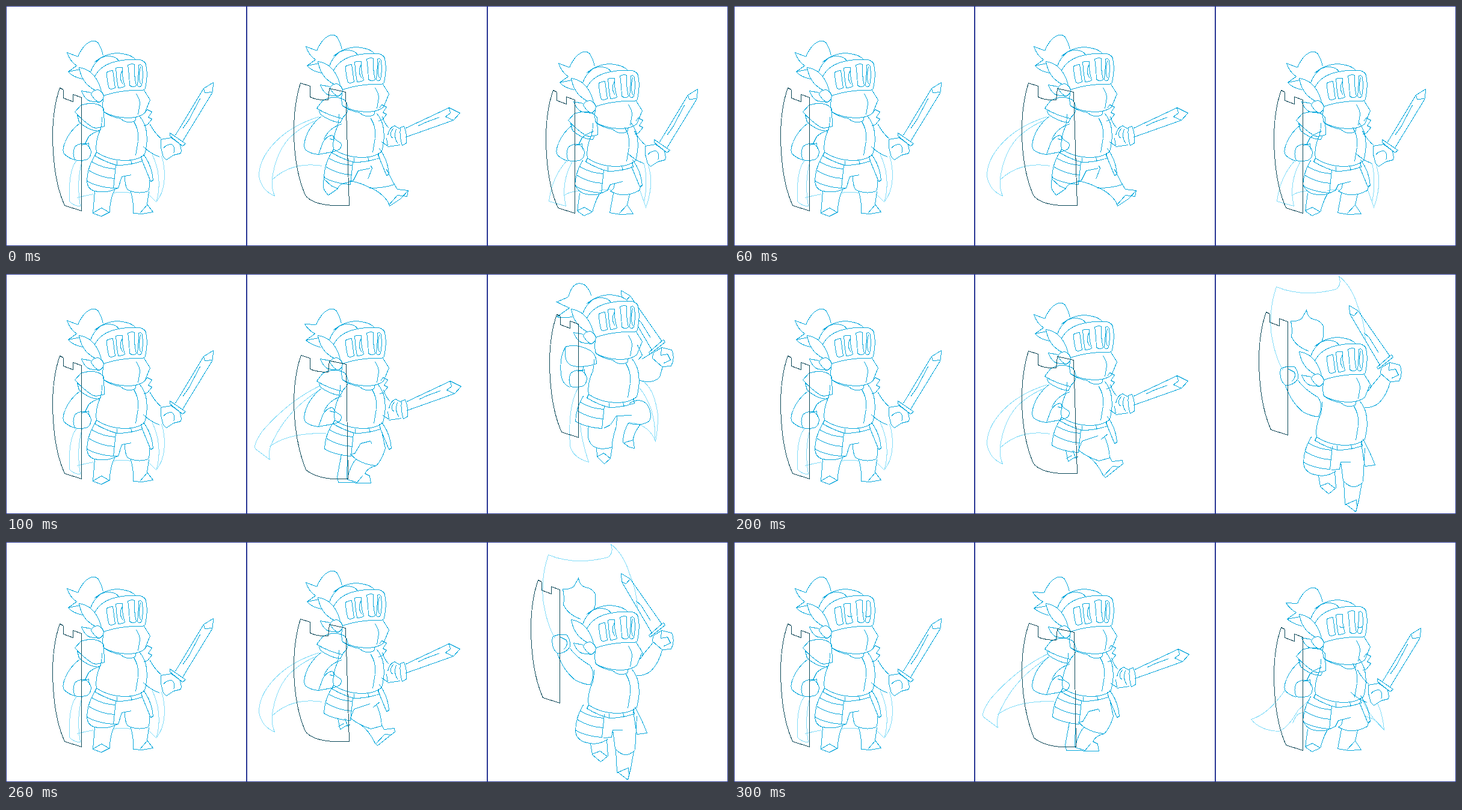
An HTML page for the animation above (0.4 s loop, 1200 by 400 pixels).

```html
<!DOCTYPE html>
<html lang="en">
<head>
<meta charset="utf-8">
<title>Knight: idle, run, jump</title>
<style>
html, body { margin: 0; width: 100%; height: 100%; overflow: hidden; background: #fff; }
svg { display: block; width: 1200px; height: 400px; }
path { fill: none; stroke: #08a8dc; stroke-width: 1; }
path.fill { fill: #fff; }
path.cape { stroke: #82dcf8; }
path.shield { stroke: #0a4858; }
path.frame { stroke: #283593; }
</style>
</head>
<body>
<svg id="stage" viewBox="0 0 1200 400" shape-rendering="crispEdges"></svg>
<script>
const parts = {
  frame: 'M0 0H399V399H0Z',

  // Head and body, shared by all three actions
  plume: 'M119 84L101 77Q106 92 117 99L103 109Q110 118 127 121M119 84Q127 65 139 59Q149 55 154 63Q159 72 161 82M103 109L123 105',
  plumeLow: 'M119 84L100 83Q107 94 117 99L102 110Q112 118 127 122M119 84Q127 65 139 59Q149 55 154 63Q159 72 161 82M102 110L123 106',
  plumeRise: 'M934 38L915 46Q926 52 936 56L915 71Q928 74 944 70M934 38Q939 20 948 16Q960 13 966 23Q971 29 972 36',
  plumeFall: 'M965 128Q976 118 979 104V86Q974 77 963 75Q953 73 951 60L943 74Q935 79 925 78Q928 92 926 104Q934 121 955 128',
  'helm.fill': 'M140 110Q144 95 160 84Q180 75 198 80Q209 82 215 89L222 89Q230 91 232 97Q236 115 231 136Q230 140 225 140Q190 139 162 149Q150 130 147 117Z',
  head: 'M147 117Q155 101 175 94Q198 87 222 89M146 94Q158 82 172 83Q183 84 187 91'
    + 'M167 110Q172 107 177 107L181 136Q175 139 171 137Q167 125 167 110ZM182 103Q187 101 193 102Q192 118 197 133Q193 136 186 136Q183 120 182 103Z'
    + 'M202 98Q208 95 213 97Q212 115 216 132Q211 136 205 132Q204 110 202 98ZM220 98Q225 96 226 101Q228 118 225 132Q221 136 218 132Q220 115 220 98Z',
  jaw: 'M229 140L239 156L230 178Q222 185 205 186Q180 186 162 176Q159 167 161 155M216 146Q222 155 222 163L219 181M162 176Q175 185 190 187Q200 197 214 191L216 184',
  'leaf.fill': 'M158 141Q153 121 140 110Q133 104 121 102Q124 120 134 130Q143 138 148 140',
  ear: 'M141 147Q143 140 152 139Q160 141 162 149Q161 158 154 160Q147 157 141 147M141 144L125 141Q130 155 139 158L154 160',
  open: 'M193 107Q186 119 194 130M223 101Q219 117 223 130',
  blink: 'M188 122Q192 126 197 123M218 123Q222 126 226 122',
  torso: 'M159 184Q159 195 157 204Q147 226 150 243Q170 257 200 257Q220 256 230 247Q237 220 231 200Q226 188 222 184M212 192Q221 207 219 225L215 249'
    + 'M150 243L147 249Q165 260 184 265Q205 265 226 258L224 250M184 265V257M207 257L209 264',
  skirt: 'M147 249Q135 268 134 291Q150 301 178 303L182 265M142 259Q160 270 181 271M138 274Q158 286 180 287',
  flap: 'M226 258L240 292L244 290Q242 265 228 247',
  shoulder: 'M114 176L124 165Q138 160 150 163Q160 166 162 172L163 200Q152 204 144 202Q128 192 114 176M118 181L121 193Q138 208 155 208L157 203',
  guard: 'M230 178L234 172L242 176L236 185L242 188L235 197L229 199',
  arm: 'M122 195Q105 208 98 226Q92 240 96 246Q105 254 114 256M157 206Q145 210 137 217L131 229',
  hand: 'M114 234Q120 228 131 229Q140 234 141 243Q140 254 132 256Q122 258 114 256Q109 245 114 234M126 231L137 228L138 238',
  sword: 'M239 197Q247 212 258 221M228 234Q240 246 255 251M257 222L274 219L288 229Q292 238 290 245L278 248L266 256L261 251L257 236ZM261 237Q265 230 275 230Q282 236 278 245'
    + 'M272 211L298 229L293 233L272 216ZM281 215L328 137L344 127L343 143L293 225M328 137L330 144L343 143M293 204L303 190L322 154',
  shield: 'M95 139L89 136Q77 170 77 218Q78 290 97 332L125 341V152L111 147V159L95 153V139',

  // Idle
  legs: 'M178 303L186 303L192 284L208 281M197 283Q197 300 202 306Q220 314 236 308Q239 300 238 290M134 291Q135 305 147 308Q165 312 180 305L186 303'
    + 'M147 308L144 345L158 350L172 343Q172 322 180 306M145 344L158 336L172 344M207 309Q212 328 211 345L225 346L244 343L234 330L237 309M222 345L234 331',
  cape: 'M118 256Q103 270 105 325Q112 333 123 333Q116 295 126 257M118 319Q129 316 145 313M179 311Q192 308 207 311M236 313L249 326Q263 310 263 280Q262 260 258 250M243 248Q260 285 250 324',

  // Run
  runShoulder: 'M516 178L526 165Q545 155 562 164Q571 174 566 186L558 195Q535 190 516 178M520 182L522 188Q538 200 555 202L559 195',
  runArm: 'M524 190Q505 205 498 225Q493 240 497 246Q505 253 519 254L526 234Q533 222 542 222L547 229L556 235Q560 245 545 249L519 254M558 203Q535 210 528 229M538 228L546 230',
  runSword: 'M627 193Q632 207 638 212M626 235L636 242M636 224Q638 212 647 208L656 213M636 242L634 229M636 243L657 240M645 213Q636 224 645 229M650 214Q645 228 653 238'
    + 'M657 211L663 209Q669 225 667 237L660 241Q655 225 657 211M666 212L738 178L756 187L745 199L666 227M738 178L740 187L732 193L745 199M687 208L700 202L722 194',
  'runCape.cape': 'M521 186Q469 211 425 262Q410 285 414 291L438 309Q434 296 443 278Q468 225 522 192M438 287Q468 264 532 265',
  'strideCape.cape': 'M520 184Q462 202 434 242Q420 262 420 283Q424 307 446 316Q439 300 443 280Q450 242 470 220Q490 200 516 190M442 289Q475 258 525 266',
  'runShield.shield': 'M505 140L490 135Q478 168 478 218Q480 282 498 326Q520 344 568 341L565 150L537 144L535 163Q516 163 505 158Z',
  'strideShield.shield': 'M505 133L489 128Q477 165 478 218Q480 276 497 315Q512 335 570 332L564 143L537 137L535 156Q516 157 505 151Z',
  passLegs: 'M572 300L579 299L589 282L605 278M624 262L630 290Q624 310 615 319Q597 318 581 308L572 300M605 278L608 283'
    + 'M557 300L550 338L552 347L606 348L604 336L596 332Q602 321 615 319M567 301L566 342M581 308Q570 322 567 342L583 347L592 336',
  strideLegs: 'M571 292L577 290L585 274L605 270M606 266L608 270L601 288M571 291Q590 294 605 303Q627 303 645 297L632 272M529 284Q524 300 529 307L535 315L551 304Q553 295 571 293M528 288L540 299L551 304'
    + 'M605 302Q623 310 634 325L637 333L655 321L668 307L650 305L645 297M636 331L650 315L666 317L668 307',
  crossLegs: 'M572 293L578 278L605 269M621 266L610 275M572 293Q585 304 606 311L624 306Q623 286 615 270M551 293L555 312L564 306L572 304M552 307L561 302M563 294L568 308'
    + 'M588 303Q604 315 613 335L617 339L633 326L646 316L645 310L628 312L624 305M614 336L629 320L640 321',

  // Jump
  crouchLegs: 'M946 298Q950 310 963 313Q981 316 990 311L999 307L1004 297L1025 292M1011 296Q1010 306 1004 308Q1026 321 1052 307L1055 298'
    + 'M953 312L949 341L960 349L974 343Q978 327 985 314M950 340L961 335L974 343M1009 312L1003 344L1020 347L1042 346L1032 331L1036 313M1018 346L1032 331',
  'crouchCape.cape': 'M932 257Q907 284 902 325L930 333Q921 296 940 260M928 315Q935 309 951 308M986 307L1005 305M1053 306L1063 335Q1073 308 1071 283L1067 263M1060 262Q1067 292 1060 326',
  'landCape.cape': 'M915 247Q887 287 859 295Q874 314 906 315Q922 307 937 280L958 261M928 302Q936 279 949 286M1042 256Q1049 282 1080 313Q1078 287 1069 268M1050 291Q1065 292 1080 313',
  riseLegs: 'M994 256L1004 251L1014 236L1040 235M1015 236L1014 253Q1006 278 1007 288Q990 294 976 287Q963 277 968 253M981 289L982 304L994 316L1004 307L1007 288M982 304L993 298L1004 307'
    + 'M1036 215Q1054 204 1066 218Q1075 236 1068 245Q1055 254 1034 248M1034 248Q1025 263 1025 280L1035 288L1044 290L1042 276Q1042 266 1054 250M1026 281L1042 276',
  riseArm: 'M929 121Q947 115 969 126Q981 133 981 149Q960 156 943 153Q926 150 929 121M929 122Q919 139 922 166Q924 184 937 188M959 153L958 162M1049 118L1057 135L1050 143M1053 177Q1076 183 1086 171L1091 154M1057 141L1073 131',
  'riseCape.cape': 'M950 190Q933 220 937 286Q942 306 968 313Q957 281 954 252M1057 178Q1077 189 1083 235Q1083 260 1079 278Q1068 250 1036 247M1053 190Q1080 225 1078 274',
  raised: 'M1068 130L1070 133L1095 113L1092 109ZM1074 128L1023 41L1022 27L1037 36L1090 112M1023 41L1030 44L1037 36M1047 73L1055 80L1071 106'
    + 'M1075 131L1089 122L1106 126Q1112 139 1105 153L1090 154L1074 140ZM1089 122L1088 135L1099 133L1104 143L1093 148',
  fallArm: 'M908 158Q917 152 931 154Q938 162 937 174Q929 186 916 185Q905 176 908 158M921 158L931 163Q934 172 927 178M916 185Q925 213 946 230Q963 238 971 237Q980 218 970 205Q948 192 937 177'
    + 'M1053 176L1059 187L1053 195M1090 180Q1085 200 1072 214Q1061 223 1048 222M1056 190L1075 167',
  fallLegs: 'M993 326L1006 325L1008 313L1024 313M1008 313L1012 344Q1029 363 1045 346L1048 290M946 314Q947 332 970 335Q985 338 1000 328M1042 282L1048 320L1065 318Q1055 292 1045 275'
    + 'M971 335L974 354L988 366L1000 356L998 329M974 353L987 348L999 357M1013 346L1015 382L1033 396L1038 376L1043 348M1015 384L1034 376L1035 391',
  'fallCape.cape': 'M1035 50Q1026 20 1005 3Q1010 18 1000 25Q945 39 901 21Q889 55 892 95Q898 137 912 160M1035 50Q1048 80 1049 110'
};

// Each pose is a back-to-front list of "part dx dy"
const face = (x, y, plume, eyes) =>
  `plume${plume};helm X Y;head X Y;jaw X Y;leaf X Y;ear X Y;${eyes} X Y;`.replace(/X/g, x).replace(/Y/g, y);

const idle = eyes => 'cape;sword;torso;skirt;flap;legs;arm;hand;shoulder;guard;' + face(0, 0, '', eyes) + 'shield';

const pass = 'runCape;runSword;torso 396 0;skirt 395 0;flap 396 0;passLegs;runArm;runShoulder;guard 392 0;'
  + face(397, 0, 'Low 396 0', 'open') + 'runShield';

const stride = legs => 'strideCape;runSword -2 -9;torso 394 -5;skirt 394 -6;flap 392 -10;runArm 0 -7;runShoulder 0 -8;guard 390 -8;'
  + legs + ';' + face(397, -10, ' 397 -10', 'open') + 'strideShield';

const crouch = (cape, arm, plume, eyes, drop) => `${cape};${arm};torso 816 10;skirt 811 8;flap 813 9;crouchLegs;arm 820 2;hand 820 1;`
  + 'shoulder 820 14;guard 816 14;' + face(818, 18, plume, eyes) + 'shield 820 ' + drop;

const rise = 'riseCape;raised;torso 818 -43;skirt 812 -46;riseLegs;riseArm;hand 824 -69;'
  + face(818, -44, 'Rise', 'open') + 'shield 826 -69';

const fall = 'fallCape;raised 0 25;torso 818 28;skirt 812 22;fallLegs;fallArm;'
  + face(818, 27, 'Fall', 'open') + 'shield 795 -73';

const poses = [
  [idle('open'), stride('strideLegs'), crouch('crouchCape', 'sword 805 11', ' 817 18', 'open', 4)],
  [idle('open'), pass, rise],
  [idle('open'), stride('crossLegs'), fall],
  [idle('blink'), pass, crouch('landCape', 'sword 797 16', 'Low 817 18', 'blink', 6)]
];

const shapes = {};
for (const key in parts) {
  const [name, kind = key] = key.split('.');
  shapes[name] = { kind, d: parts[key] };
}

const draw = list => list.split(';').map(item => {
  const [name, x = 0, y = 0] = item.split(' ');
  const { kind, d } = shapes[name];
  return `<path class="${kind}" d="${d}" transform="translate(${+x + .5} ${+y + .5})"/>`;
}).join('');

const stage = document.getElementById('stage');
stage.innerHTML = draw('frame;frame 400 0;frame 800 0')
  + poses.map(p => `<g>${draw(p.join(';'))}</g>`).join('');
const groups = [...stage.querySelectorAll('g')];

function tick() {
  const now = Math.floor(performance.now() / 100) % poses.length;
  groups.forEach((g, i) => g.style.display = i === now ? '' : 'none');
  requestAnimationFrame(tick);
}
tick();
</script>
</body>
</html>
```
